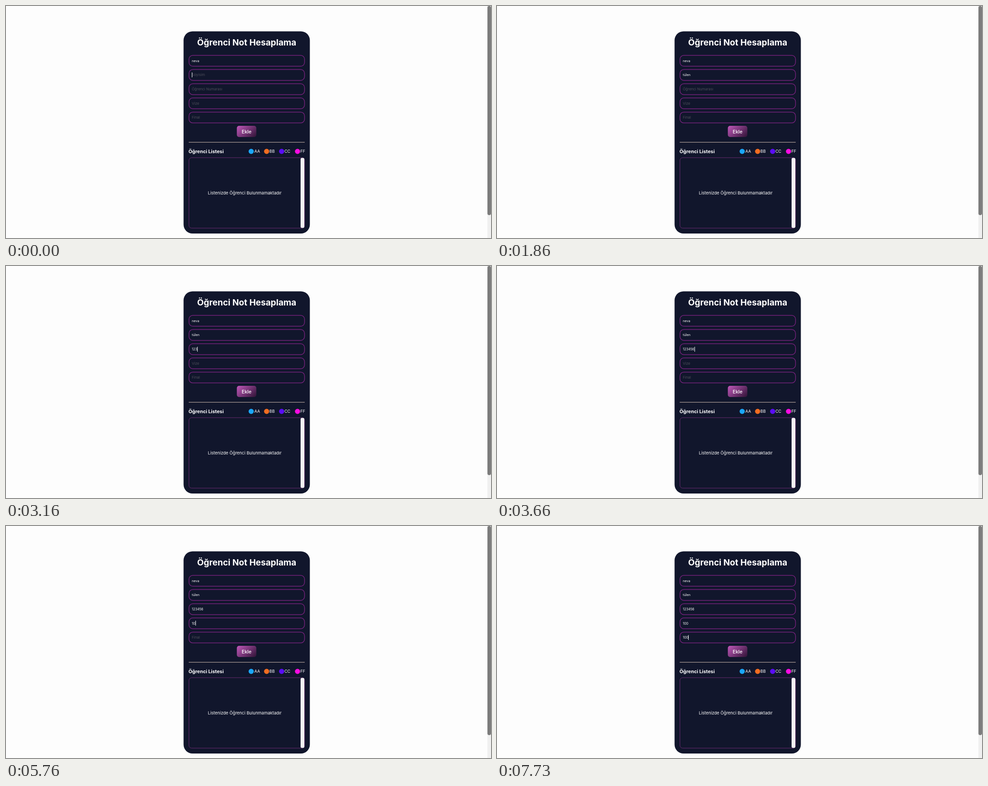
An HTML page for the animation above (8 s loop, 1083 by 517 pixels).

```html
<!DOCTYPE html>
<html lang="tr">
<head>
<meta charset="utf-8">
<title>Öğrenci Not Hesaplama</title>
<style>
  html, body { margin: 0; width: 100%; height: 100%; overflow: hidden; background: #fdfdfd; }
  svg { display: block; width: 1083px; height: 517px; }
  text { font-family: Inter, "Open Sans", sans-serif; fill: #fff; }
  .title { font-size: 19.2px; font-weight: 700; }
  .heading { font-size: 10.8px; font-weight: 700; }
  .button { font-size: 11px; font-weight: 500; }
  .legend { font-size: 9px; }
  .empty { font-size: 9.5px; }
  .value { font-size: 7.3px; }
  .hint { font-size: 8px; fill: #4d4e59; }
  .middle { text-anchor: middle; }
</style>
</head>
<body>
<svg id="stage" viewBox="0 0 1083 517">
  <defs>
    <linearGradient id="buttonFill" x1="0" y1="0.2" x2="1" y2="0.8">
      <stop offset="0" stop-color="#b653b0"/>
      <stop offset="1" stop-color="#3a183f"/>
    </linearGradient>
  </defs>
  <rect width="1083" height="517" fill="#fdfdfd"/>
  <rect x="1075" width="8" height="517" fill="#f0f0f0"/>
  <rect x="1075" width="8" height="466" rx="4" fill="#7c7c7c"/>

  <rect x="396.5" y="56.5" width="282" height="450.5" rx="20" fill="#11162c"/>
  <text class="title middle" x="537.5" y="87.5">Öğrenci Not Hesaplama</text>
  <g id="fields"></g>

  <rect x="515.5" y="267" width="43.5" height="25" rx="5" fill="url(#buttonFill)"/>
  <text class="button middle" x="537.3" y="283.5">Ekle</text>
  <rect x="408" y="303" width="259" height="1.2" fill="#b5a39c"/>

  <text class="heading" x="407.5" y="327.5">Öğrenci Listesi</text>
  <g id="legend"></g>
  <rect x="408.5" y="338" width="258.3" height="157" rx="6" fill="none" stroke="#6b2a72"/>
  <rect x="657.8" y="338.5" width="8.4" height="156" rx="3" fill="#f3f1f2"/>
  <text class="empty middle" x="533" y="420">Listenizde Öğrenci Bulunmamaktadır</text>

  <rect id="caret" width="1" height="11" fill="#fff"/>
  <path id="pointer" d="M-4 -7H-1L0 -6L1 -7H4M0 -6V6M-4 7H-1L0 6L1 7H4" fill="none" stroke="#e8e8ee"/>
</svg>
<script>
const LOOP = 8000;
const TEXT_X = 415;
const rowY = row => 122 + 31.6 * row;
const byId = id => document.getElementById(id);

function add(parent, tag, attrs, text = '') {
  const node = document.createElementNS('http://www.w3.org/2000/svg', tag);
  for (const key in attrs) node.setAttribute(key, attrs[key]);
  node.textContent = text;
  return parent.appendChild(node);
}

// keys: the time at which each character is typed
const fields = [
  { hint: 'İsim', value: 'neva', keys: [0, 0, 0, 0] },
  { hint: 'Soyisim', value: 'tülen', keys: [560, 760, 1060, 1200, 1300] },
  { hint: 'Öğrenci Numarası', value: '123456', keys: [2830, 3000, 3160, 3400, 3500, 3660] },
  { hint: 'Vize', value: '100', keys: [5530, 5760, 5860] },
  { hint: 'Final', value: '100', keys: [7400, 7600, 7730] }
];

const caretSpans = [
  { row: 1, on: 0, off: 330 }, { row: 1, on: 560, off: 1860 },
  { row: 2, on: 2200, off: 2700 }, { row: 2, on: 2830, off: 4200 },
  { row: 3, on: 4800, off: 5360 }, { row: 3, on: 5530, off: 6400 },
  { row: 4, on: 6800, off: 7330 }, { row: 4, on: 7400, off: LOOP }
];

const pointerMoves = [
  { on: 1960, stop: 2000, off: 2030, from: [528.5, 152], to: [528.5, 176.5] },
  { on: 4100, stop: 4500, off: 4660, from: [531, 187], to: [537.5, 206.5] },
  { on: 6430, stop: 6500, off: 6530, from: [537.5, 218], to: [537.5, 236.5] }
];

const legend = [
  ['AA', 547.5, 554.6, '#1ba6f9'], ['BB', 582, 588.3, '#f36d21'],
  ['CC', 615.5, 621.8, '#5a0df5'], ['FF', 651, 657.5, '#f80ce0']
];

fields.forEach((field, row) => {
  add(byId('fields'), 'rect', {
    x: 408.6, y: rowY(row) - 12, width: 258, height: 24.2, rx: 8.5,
    fill: 'none', stroke: '#74227b', 'stroke-width': 1.5
  });
  field.label = add(byId('fields'), 'text', { x: TEXT_X, y: rowY(row) + 2.7 });
});

legend.forEach(([grade, cx, x, fill]) => {
  add(byId('legend'), 'circle', { cx, cy: 324, r: 5.8, fill });
  add(byId('legend'), 'text', { class: 'legend', x, y: 327 }, grade);
});

const activeAt = (spans, time) => spans.find(s => time >= s.on && time < s.off);
const show = (node, visible) => node.setAttribute('visibility', visible ? 'visible' : 'hidden');

function drawFields(time) {
  for (const { label, hint, value, keys } of fields) {
    const typed = value.slice(0, keys.filter(key => key <= time).length);
    const text = typed || hint;
    if (label.textContent !== text) label.textContent = text;
    label.setAttribute('class', typed ? 'value' : 'hint');
  }
}

function drawCaret(time) {
  const span = activeAt(caretSpans, time);
  show(byId('caret'), span);
  if (!span) return;
  const { label, keys } = fields[span.row];
  const width = time < keys[0] ? 0 : label.getComputedTextLength();
  byId('caret').setAttribute('x', Math.round(TEXT_X + width));
  byId('caret').setAttribute('y', Math.round(rowY(span.row) - 5.5));
}

function drawPointer(time) {
  const move = activeAt(pointerMoves, time);
  show(byId('pointer'), move);
  if (!move) return;
  const p = Math.min(1, (time - move.on) / (move.stop - move.on));
  const eased = p * p * (3 - 2 * p);
  const [x, y] = move.from.map((start, i) => start + (move.to[i] - start) * eased);
  byId('pointer').setAttribute('transform', `translate(${x} ${y})`);
}

const startTime = performance.now();
function draw() {
  const time = (performance.now() - startTime) % LOOP;
  drawFields(time);
  drawCaret(time);
  drawPointer(time);
  requestAnimationFrame(draw);
}
draw();
</script>
</body>
</html>
```
